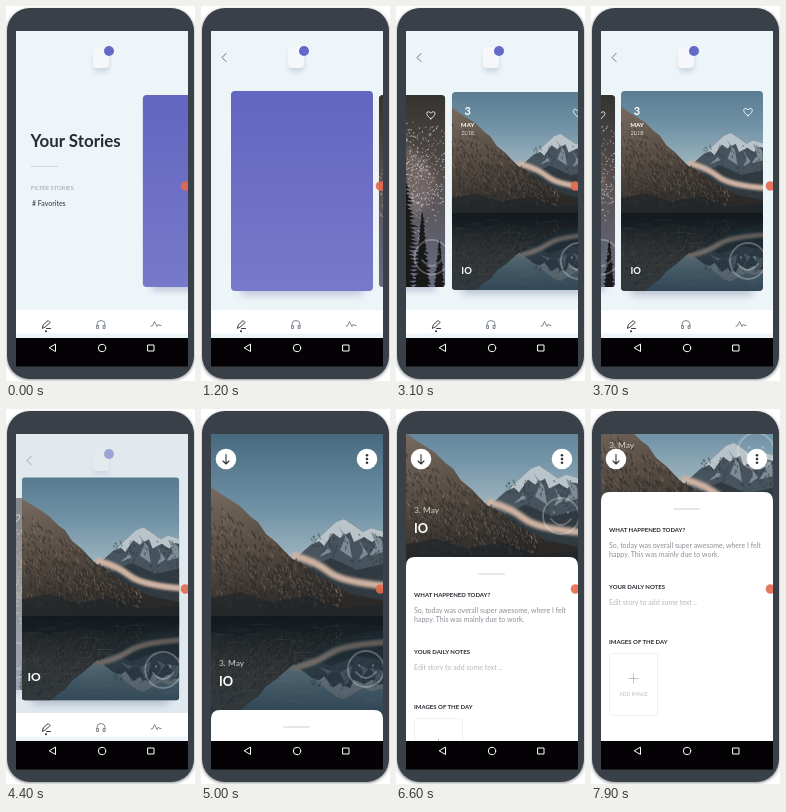
These frames come from a looping animation (189 px wide and 375 px high, 8000 ms). An HTML page:

```html
<!DOCTYPE html>
<html lang="en">
<head>
<meta charset="utf-8">
<title>Story journal</title>
<style>
  html, body { margin: 0; width: 100%; height: 100%; overflow: hidden; background: #fff; }
  svg { display: block; width: 100vw; height: 100vh; }
  text { font-family: Lato, "Open Sans", sans-serif; }
  .bold { font-weight: 700; }
  .mid { text-anchor: middle; }
  .line { fill: none; stroke-linecap: round; stroke-linejoin: round; }
</style>
</head>
<body>
<svg viewBox="0 0 189 375">
  <defs>
    <linearGradient id="violet" x2="0" y2="1"><stop stop-color="#6266c0"/><stop offset="1" stop-color="#7779ca"/></linearGradient>
    <linearGradient id="night" x2="0" y2="1"><stop stop-color="#35332f"/><stop offset=".45" stop-color="#57504f"/><stop offset="1" stop-color="#666d84"/></linearGradient>
    <linearGradient id="sky" x2="0" y2="1"><stop stop-color="#46687f"/><stop offset=".45" stop-color="#7495a8"/><stop offset=".75" stop-color="#a9bcc5"/></linearGradient>
    <linearGradient id="slope" x2=".3" y2="1"><stop stop-color="#776a60"/><stop offset=".5" stop-color="#554b42"/><stop offset="1" stop-color="#2c2a28"/></linearGradient>
    <linearGradient id="depth" x2="0" y2="1"><stop stop-color="#0d151a" stop-opacity=".72"/><stop offset=".35" stop-color="#13222c" stop-opacity=".5"/><stop offset="1" stop-color="#12232f" stop-opacity=".78"/></linearGradient>
    <filter id="soft" x="-30%" y="-60%" width="160%" height="220%"><feGaussianBlur stdDeviation="2.6"/></filter>
    <filter id="mist" x="-20%" y="-60%" width="140%" height="220%"><feGaussianBlur stdDeviation="1.4"/></filter>
    <filter id="shade" x="-20%" y="-20%" width="140%" height="140%"><feGaussianBlur stdDeviation="4"/></filter>
    <clipPath id="screen"><rect x="10" y="25" width="172" height="307"/></clipPath>
    <clipPath id="cardClip"><rect width="142" height="200" rx="4"/></clipPath>
    <clipPath id="lakeClip"><rect id="lakeBox"/></clipPath>
    <clipPath id="waterClip"><rect width="180" height="130"/></clipPath>
    <g id="mood" class="line" stroke="#fff" stroke-width="1.8" opacity=".27">
      <circle r="18"/><path d="M-10 3Q0 15 10 3M-7-4v1M7-4v1"/>
    </g>
    <path id="heart" class="line" stroke="#fff" stroke-width=".9" d="M0 3.700C-8-1.500-3-6 0-2C3-6 8-1.500 0 3.700Z"/>
  </defs>

  <rect x="1" y="3" width="187" height="371" rx="22" fill="#8b8f94" filter="url(#mist)"/>
  <rect x="1" y="2" width="187" height="371" rx="23" fill="#3a4047"/>
  <rect x="10" y="331" width="172" height="29.500" fill="#040204"/>

  <g clip-path="url(#screen)">
    <rect x="10" y="25" width="172" height="307" fill="#eef5f9"/>
    <g id="home">
      <text x="24.5" y="141" font-size="16.9" class="bold" fill="#272b33">Your Stories</text>
      <path d="M25 160.5h27" stroke="#cfd5da" stroke-width="1"/>
      <text x="25" y="184" font-size="5.9" fill="#9aa2aa">FILTER STORIES</text>
      <text x="26" y="200" font-size="7" fill="#30353c"># Favorites</text>
    </g>
    <path id="back" class="line" d="M25 47.500l-4 4 4 4" stroke="#69737d" stroke-width="1"/>
    <rect x="88" y="46" width="15" height="20" rx="4" fill="#9fb0c8" opacity=".45" filter="url(#soft)"/>
    <rect x="87" y="41" width="16" height="21" rx="4" fill="#f5f7fa"/>
    <circle cx="103" cy="45" r="5" fill="#6469c8"/>

    <g id="violetCard">
      <rect x="10" y="12" width="122" height="192" fill="#8e95ba" opacity=".5" filter="url(#shade)"/>
      <rect width="142" height="200" rx="4" fill="url(#violet)"/>
    </g>
    <g id="fireCard">
      <rect x="10" y="12" width="122" height="192" fill="#8e95ba" opacity=".5" filter="url(#shade)"/>
      <g clip-path="url(#cardClip)">
        <rect width="142" height="200" fill="url(#night)"/>
        <ellipse cx="75" cy="92" rx="55" ry="45" fill="#b5a49f" opacity=".25" filter="url(#shade)"/>
        <g id="sparks" class="line"></g>
        <path id="trees" fill="#1a1919"/>
        <use href="#mood" x="128" y="169"/>
      </g>
      <g fill="#fff" class="mid">
        <text x="17" y="23.500" font-size="11" class="bold">3</text>
        <text x="17" y="35.500" font-size="6.2" class="bold">JUN</text>
        <text x="17" y="43.500" font-size="5.6" opacity=".8">2018</text>
      </g>
      <use href="#heart" x="127" y="21"/>
    </g>
    <rect id="dim" x="10" y="25" width="172" height="307" fill="#d6dee6"/>
    <g id="tabs">
      <rect x="10" y="304" width="172" height="28" fill="#eef5f9"/>
      <rect x="10" y="304" width="172" height="23.500" fill="#fff"/>
      <g class="line" stroke="#737b84" stroke-width=".9">
        <path stroke="#22262c" d="M36.500 322l.7-3 5-4.500 2 2-5 4.500zM40.500 322.500h4"/>
        <path d="M91 320v-1.500a4 4 0 0 1 8 0v1.500M91 319.500h1.500v3H91zM97.500 319.500H99v3h-1.500z"/>
        <path d="M145 320h1.500l2-4.500 2.500 5 1.500-2.500 1 1.500h1.500"/>
      </g>
      <circle cx="40" cy="325.200" r="1" fill="#22262c"/>
    </g>

    <rect id="lakeShadow" fill="#7f8aa5" opacity=".5" filter="url(#shade)"/>
    <g clip-path="url(#lakeClip)">
      <g id="lake">
        <g id="shore">
          <rect y="-185" width="180" height="186" fill="url(#sky)"/>
          <path fill="#48545d" d="M76-50 95-67 112-82 125-94 133-97 142-91 152-84 160-88 180-82V0H76Z"/>
          <path fill="#b9c4ca" d="M100-71 112-82 125-94 133-97 142-91 152-84 160-88 180-82V-77L168-80 161-74 153-79 143-74 139-84 129-78 122-83 113-70 108-75Z"/>
          <path fill="#7c8b94" d="M127-90 134-78 129-66 141-58 138-76ZM160-84 165-71 158-60 172-64 171-76ZM112-78 117-68 108-59 120-64ZM148-76 152-66 148-56 157-62Z"/>
          <path fill="#303a40" d="M98-48 120-58 146-46 180-54V0H98Z"/>
          <path id="rocks" class="line" stroke="#2a343a" stroke-width="1.300" opacity=".5"/>
          <path class="line" d="M84-60Q104-55 118-44T180-30" stroke="#cfb3a2" stroke-width="7" filter="url(#mist)"/>
          <path fill="url(#slope)" d="M0-129 10-122 18-117 29-110 40-99 47-94 55-82 66-73 80-58 95-50 108-39 124-31 140-22 180-14V0H0Z"/>
          <path id="ribs" class="line" stroke="#1f2022" stroke-width="1.300" opacity=".45"/>
          <path id="lights" class="line" stroke="#a18b78" stroke-width="1" opacity=".35"/>
          <path fill="#20262a" opacity=".7" d="M0-18 30-24 60-14 95-20 130-8 180-12V0H0Z"/>
        </g>
        <g clip-path="url(#waterClip)">
          <use href="#shore" transform="scale(1 -.86)"/>
          <rect width="180" height="130" fill="url(#depth)"/>
        </g>
        <path id="ripples" class="line" stroke="#96a2a6" stroke-width=".6" opacity=".14"/>
      </g>
      <use id="lakeMood" href="#mood"/>
    </g>
    <g id="lakeDate" fill="#fff" class="mid">
      <text x="16" y="23.500" font-size="11" class="bold">3</text>
      <text x="16" y="35.500" font-size="6.2" class="bold">MAY</text>
      <text x="16" y="43.500" font-size="5.6" opacity=".8">2018</text>
      <use href="#heart" x="127" y="21"/>
    </g>
    <text id="storyDay" x="18" font-size="8.4" fill="#fff">3. May</text>
    <text id="storyName" class="bold" fill="#fff">IO</text>

    <g id="sheet">
      <path d="M10 260V9Q10 0 19 0H173Q182 0 182 9V260Z" fill="#fff"/>
      <path class="line" d="M83 17h25" stroke="#e4e6e8" stroke-width="2"/>
      <g class="bold" font-size="6" fill="#25292f">
        <text x="18" y="40">WHAT HAPPENED TODAY?</text>
        <text x="18" y="97">YOUR DAILY NOTES</text>
        <text x="18" y="151.500">IMAGES OF THE DAY</text>
      </g>
      <g font-size="7" fill="#8b9096">
        <text x="18" y="56">So, today was overall super awesome, where I felt</text>
        <text x="18" y="65">happy. This was mainly due to work.</text>
        <text x="18" y="113" fill="#b4b8bc">Edit story to add some text ..</text>
      </g>
      <rect x="18.500" y="161.500" width="48" height="62" rx="3" fill="#fff" stroke="#eff0f2"/>
      <path d="M37.500 186.500h10M42.500 181.500v10" stroke="#aeb3b8" stroke-width=".8"/>
      <text x="42.500" y="203.500" font-size="5" class="mid" fill="#b9bdc2">ADD IMAGE</text>
    </g>
    <g id="buttons">
      <circle cx="25" cy="50" r="10.300" fill="#fff"/><circle cx="166" cy="50" r="10.300" fill="#fff"/>
      <path class="line" d="M25 45.500v9M22 52l3 3 3-3" stroke="#30353b" stroke-width="1.100"/>
      <g fill="#30353b"><circle cx="166" cy="46.200" r="1.300"/><circle cx="166" cy="50" r="1.300"/><circle cx="166" cy="53.800" r="1.300"/></g>
    </g>
    <circle cx="179.500" cy="180" r="4.800" fill="#e4694c" opacity=".9"/>
  </g>
  <g class="line" stroke="#fff" stroke-width="1">
    <path d="M49.500 338.500v7l-6-3.500z"/><circle cx="96" cy="342" r="3.700"/><rect x="142" y="339" width="6" height="6"/>
  </g>
</svg>
<script>
const LOOP = 8000, STEP = 145, CENTER = 101;
const $ = id => document.getElementById(id);
const set = (id, attrs) => { for (const k in attrs) $(id).setAttribute(k, attrs[k]); };
const clamp = v => Math.max(0, Math.min(1, v));
const mix = (a, b, p) => a + (b - a) * p;
const easeOut = p => 1 - (1 - p) ** 3;
const easeInOut = p => p * p * (3 - 2 * p);
const ramp = (t, from, to, ease = easeInOut) => ease(clamp((t - from) / (to - from)));

let seed = 7;
const rnd = () => (seed = seed * 16807 % 2147483647) / 2147483647;
const dash = (x, y, dx, dy) => `M${x.toFixed(1)} ${y.toFixed(1)}l${dx.toFixed(1)} ${dy.toFixed(1)}`;
const scatter = (count, make) => Array.from({ length: count }, make).join('');

function drawSparks() {
  const bursts = [[62, 72, 48], [114, 72, 44], [30, 105, 38], [92, 108, 48]];
  for (const color of ['#fff6f0', '#d2b4a8', '#b9bdd0']) {
    const d = bursts.map(([cx, cy, radius]) => scatter(130, () => {
      const a = rnd() * 2 * Math.PI, r = radius * rnd() ** .7, len = .2 + rnd();
      return dash(cx + r * Math.cos(a), cy + r * Math.sin(a), Math.cos(a) * len, Math.sin(a) * len);
    })).join('');
    const path = document.createElementNS('http://www.w3.org/2000/svg', 'path');
    path.setAttribute('d', d);
    path.setAttribute('stroke', color);
    path.setAttribute('stroke-width', .9);
    path.setAttribute('opacity', .75);
    $('sparks').append(path);
  }
}

function tree(x, top, width) {
  const left = [], right = [];
  for (let y = top; y < 204; y += 4) {
    const half = 1 + width * Math.min(1, (y - top) / 75);
    left.unshift(`${x - half * (.4 + .3 * rnd())} ${y + 4}`, `${x - half * (.7 + .5 * rnd())} ${y + 3}`);
    right.push(`${x + half * (.7 + .5 * rnd())} ${y + 3}`, `${x + half * (.4 + .3 * rnd())} ${y + 4}`);
  }
  return `M${x} ${top}L${right.join('L')}L${left.join('L')}Z`;
}

// Short strokes below the left ridge, which falls from left to right.
const slopeStrokes = (count, size) => scatter(count, () => {
  const x = rnd() * 130, top = -116 + x * .68;
  return dash(x, top + rnd() * (-top - 10), size * (rnd() - .2), size * (.3 + rnd()));
});

function drawScenery() {
  drawSparks();
  const trees = [[70, 77, 12], [97, 58, 14], [51, 95, 11], [118, 122, 10], [83, 110, 11], [39, 145, 9], [136, 150, 9], [10, 172, 8], [24, 164, 7]];
  set('trees', { d: trees.map(a => tree(...a)).join('') });
  set('ribs', { d: slopeStrokes(420, 4) });
  set('lights', { d: slopeStrokes(220, 3) });
  set('rocks', { d: scatter(170, () => dash(98 + rnd() * 80, -82 + rnd() * 60, 3 * (rnd() - .5), 3 * rnd())) });
  set('ripples', { d: scatter(45, () => dash(rnd() * 160, 8 + rnd() * 85, 5 + rnd() * 16, 0)) });
}

function cardBox(index, scroll) {
  const cx = 205 + STEP * index - scroll;
  const s = 1 - .04 * Math.min(1, Math.abs(cx - CENTER) / 100);
  return { x: cx - 71 * s, y: 185 - 100 * s, s };
}
const place = ({ x, y, s }) => `translate(${x} ${y}) scale(${s})`;

function render(t) {
  const toFirst = ramp(t, 200, 850, easeOut);
  const scroll = 104 * toFirst + STEP * ramp(t, 1250, 1900, easeOut) + STEP * ramp(t, 2800, 3480, easeOut);
  set('home', { transform: `translate(${-1.15 * Math.min(scroll, 110)} 0)`, opacity: 1 - toFirst });
  set('back', { opacity: toFirst });
  set('violetCard', { transform: place(cardBox(0, scroll)) });
  set('fireCard', { transform: place(cardBox(1, scroll)) });

  // The opened card passes through a half-grown pose before it fills the screen.
  const a = ramp(t, 4200, 4400, p => p * p), b = ramp(t, 4400, 4700, easeOut);
  const grow = (from, half, to) => mix(mix(from, half, a), to, b);
  const lift = 153 * ramp(t, 5700, 6500) + 65 * ramp(t, 6700, 7250);
  const card = cardBox(2, scroll);
  const box = {
    x: grow(card.x, 16, 10), y: grow(card.y, 69, 25),
    width: grow(142 * card.s, 157, 172), height: grow(200 * card.s, 222, 285), rx: grow(4, 3, 0)
  };
  set('lakeBox', box);
  set('lakeShadow', { x: box.x + 10, y: box.y + 12, width: box.width - 20, height: box.height - 8, opacity: .5 * (1 - b) });
  set('lake', { transform: `translate(${box.x} ${207 - .35 * lift}) scale(${box.width / 172})` });
  set('lakeMood', { x: box.x + grow(127, 141, 155), y: grow(255, 261, 260) - lift });
  set('lakeDate', { transform: place(card), opacity: 1 - ramp(t, 4200, 4380) });
  set('storyName', { x: box.x + grow(9.5, 5.5, 8), y: grow(268, 272, 277) - lift, 'font-size': grow(9.5, 12, 12.8) });
  set('storyDay', { y: 257 - lift, opacity: .75 * ramp(t, 4550, 4850) });

  const shown = ramp(t, 4450, 4800, easeOut);
  set('dim', { opacity: .5 * a });
  set('tabs', { opacity: 1 - ramp(t, 4450, 4650) });
  set('sheet', { transform: `translate(0 ${mix(334, 301, shown) - lift})` });
  set('buttons', { opacity: shown });
}

drawScenery();
const start = performance.now();
function frame() {
  render((performance.now() - start) % LOOP);
  requestAnimationFrame(frame);
}
render(0);
requestAnimationFrame(frame);
</script>
</body>
</html>
```
